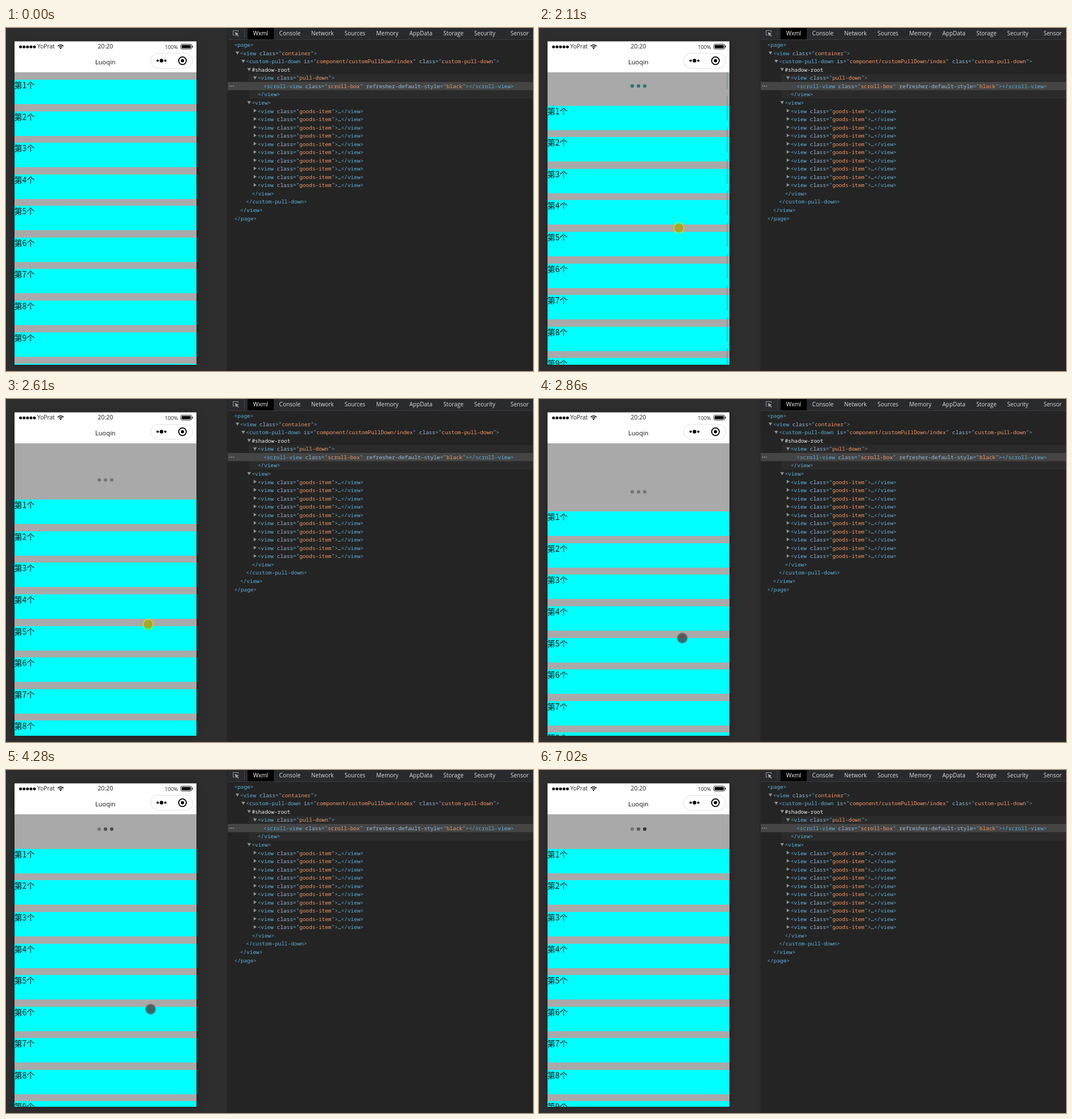
An HTML page with a canvas that plays this animation: 927x604 px, repeating every 7.18 s.

```html
<!DOCTYPE html>
<html lang="en">
<head>
<meta charset="utf-8">
<title>Pull down to refresh</title>
<style>
html, body { margin: 0; width: 100%; height: 100%; overflow: hidden; background: #2e2e2e; }
canvas { display: block; }
</style>
</head>
<body>
<canvas id="stage" width="927" height="604"></canvas>
<script>
const ctx = document.getElementById('stage').getContext('2d');
const LOOP = 7180, PRESS = 1350, RELEASE = 2860, BLINK = 3500;
const SANS = '"Open Sans", "Noto Sans", sans-serif';
const CJK = '"Noto Sans CJK SC", "Noto Sans CJK", "Noto Sans CJK JP", sans-serif';
const MONO = '"Noto Sans Mono", "DejaVu Sans Mono", monospace';
const TAG = '#5db0d7', ATTR = '#9bbbdc', VALUE = '#f29766';
const PHONE = { x: 15, y: 23.5, w: 320, h: 569.5 };
const PITCH = 55.57, ITEM_H = 43, REST = 47.8;

// Pointer path: time, x, y
const path = [
  [130, 723, 573], [600, 246, 285], [740, 240, 277], [1350, 236, 279], [1820, 236, 279],
  [2110, 246, 352], [2610, 250, 397], [RELEASE, 252, 421], [4280, 252, 421],
  [4510, 795, 479], [4800, 795, 479], [5640, 823, 596]
];

function pointerAt(t) {
  const i = path.findIndex(p => p[0] > t);
  if (i < 1) return null;
  const [a, b] = [path[i - 1], path[i]];
  const k = (t - a[0]) / (b[0] - a[0]);
  return { x: a[1] + (b[1] - a[1]) * k, y: a[2] + (b[2] - a[2]) * k };
}

const dragged = t => Math.max(0, 0.9 * (pointerAt(t).y - 279) - 20);

// The list follows the drag, then springs back to its resting place
function pullAt(t) {
  if (t < PRESS) return 0;
  if (t < RELEASE) return dragged(t);
  return REST + (dragged(RELEASE) - REST) * Math.exp((RELEASE - t) / 114);
}

function rect(x, y, w, h, color) {
  ctx.fillStyle = color;
  ctx.fillRect(x, y, w, h);
}

function disc(x, y, r, color) {
  ctx.fillStyle = color;
  ctx.beginPath();
  ctx.arc(x, y, r, 0, 7);
  ctx.fill();
}

function arc(x, y, r, from, to, width) {
  ctx.strokeStyle = '#000';
  ctx.lineWidth = width;
  ctx.beginPath();
  ctx.arc(x, y, r, from, to);
  ctx.stroke();
}

function poly(points, fill, stroke) {
  ctx.beginPath();
  points.forEach(([x, y]) => ctx.lineTo(x, y));
  ctx.closePath();
  ctx.fillStyle = fill;
  ctx.fill();
  if (stroke) {
    ctx.strokeStyle = stroke;
    ctx.lineWidth = 1;
    ctx.stroke();
  }
}

function pill(x, y, w, h, r, fill, stroke) {
  ctx.beginPath();
  ctx.roundRect(x, y, w, h, r);
  if (fill) { ctx.fillStyle = fill; ctx.fill(); }
  if (stroke) { ctx.strokeStyle = stroke; ctx.lineWidth = 1; ctx.stroke(); }
}

function text(str, x, y, size, color, font = SANS, align = 'left') {
  ctx.font = size + 'px ' + font;
  ctx.textAlign = align;
  ctx.fillStyle = color;
  ctx.fillText(str, x, y);
}

// Markup tree
const open = (name, attrs = {}) => {
  const parts = [['<' + name, TAG]];
  for (const key in attrs) {
    parts.push([' ' + key, ATTR], ['="', TAG], [attrs[key], VALUE], ['"', TAG]);
  }
  return [...parts, ['>', TAG]];
};
const close = name => [['</' + name + '>', TAG]];
const item = [...open('view', { class: 'goods-item' }), ['…', '#ddd'], ...close('view')];
// indent, arrow, parts
const rows = [
  [0, '', open('page')],
  [1, 'v', open('view', { class: 'container' })],
  [2, 'v', open('custom-pull-down', { is: 'component/customPullDown/index', class: 'custom-pull-down' })],
  [3, 'v', [['#shadow-root', '#f0f0f0']]],
  [4, 'v', open('view', { class: 'pull-down' })],
  [5, '', [...open('scroll-view', { class: 'scroll-box', 'refresher-default-style': 'black' }), ...close('scroll-view')]],
  [4, '', close('view')],
  [3, 'v', open('view')],
  ...Array(10).fill([4, '>', item]),
  [3, '', close('view')],
  [2, '', close('custom-pull-down')],
  [1, '', close('view')],
  [0, '', close('page')]
];

function drawTree() {
  rect(427, 81, 500, 43, '#2b2b2b');
  rect(390, 95, 537, 14.5, '#454545');
  for (let i = 0; i < 3; i++) disc(393.5 + i * 3.2, 102.4, 0.9, '#aaa');
  rows.forEach(([depth, arrow, parts], i) => {
    const y = 30 + i * 14.54;
    let x = 401.5 + depth * 10.3;
    if (arrow === 'v') poly([[x - 8, y - 3], [x - 1.5, y - 3], [x - 4.7, y + 2.5]], '#919191');
    if (arrow === '>') poly([[x - 7, y - 4], [x - 1.8, y - 0.8], [x - 7, y + 2.4]], '#919191');
    for (const [str, color] of parts) {
      text(str, x, y + 3.2, 9.42, color, MONO);
      x += ctx.measureText(str).width;
    }
  });
}

function drawPanel() {
  rect(388, 0, 2, 604, '#292929');
  rect(390, 0, 537, 604, '#242424');
  rect(390, 0, 537, 20, '#292a2d');
  rect(390, 20, 537, 1, '#3b3b3d');
  rect(425, 0, 46, 20, '#000');
  rect(419, 2, 1, 15, '#47484b');
  ctx.strokeStyle = '#9a9a9a';
  ctx.lineWidth = 1;
  ctx.beginPath();
  ctx.moveTo(402, 12.5);
  ctx.lineTo(399.5, 12.5);
  ctx.lineTo(399.5, 4.5);
  ctx.lineTo(408.5, 4.5);
  ctx.lineTo(408.5, 7);
  ctx.stroke();
  poly([[402.5, 7], [409.5, 10], [406.8, 11], [409.5, 14], [408.5, 15], [405.6, 12.2], [404.3, 14.5]], '#a5a5a5');
  [['Wxml', 447.8], ['Console', 499.3], ['Network', 556.7], ['Sources', 613.8], ['Memory', 670.8],
    ['AppData', 729.7], ['Storage', 787], ['Security', 842.2], ['Sensor', 903.5]]
    .forEach(([name, x], i) => text(name, x, 12.8, 10, i ? '#dcdcdc' : '#fff', SANS, 'center'));
  drawTree();
}

function drawHeader() {
  rect(PHONE.x, PHONE.y, PHONE.w, 54.5, '#fff');
  for (let i = 0; i < 5; i++) disc(25.6 + i * 6.1, 33.2, 2.5, '#000');
  text('YoPrat', 55, 36.4, 10.2, '#222');
  for (const r of [3.8, 6.8]) arc(96, 36.5, r, -Math.PI * 0.77, -Math.PI * 0.23, 1.5);
  disc(96, 35.8, 1.3, '#000');
  text('20:20', 174.8, 36, 10.6, '#222', SANS, 'center');
  text('100%', 302.5, 36.8, 9.2, '#222', SANS, 'right');
  pill(307.5, 28.5, 19, 8.5, 2, null, '#222');
  pill(309, 30, 16, 5.5, 1, '#000');
  rect(327.5, 31, 1.3, 3.5, '#222');
  text('Luoqin', 174.8, 64, 11, '#111', SANS, 'center');
  pill(254.5, 44.5, 74, 26.5, 13.2, '#fff', '#e0e0e0');
  for (let i = -1; i < 2; i++) disc(273.5 + i * 6.8, 57.5, i ? 2.1 : 3.2, '#000');
  arc(310.4, 57.6, 6.7, 0, 7, 1.8);
  disc(310.4, 57.6, 2.9, '#000');
}

// Each dot darkens in turn, then fades back
function dotColor(i, t) {
  const cycle = 880;
  const phase = (t - 5560 - i * cycle / 3 + 9 * cycle) % cycle;
  const dark = t < BLINK ? 0 : Math.max(0, 1 - phase / 480, 1 - (cycle - phase) / 290);
  const level = Math.round(117 - 66 * dark);
  return `rgb(${level},${level},${level})`;
}

function drawPhone(t) {
  const shift = pullAt(t);
  const barShown = t > 1950 && t < 2250;
  ctx.save();
  ctx.shadowColor = 'rgba(0,0,0,.3)';
  ctx.shadowBlur = 14;
  rect(PHONE.x, PHONE.y, PHONE.w, PHONE.h, '#a9a9a9');
  ctx.restore();
  ctx.save();
  ctx.beginPath();
  ctx.rect(PHONE.x, PHONE.y, PHONE.w, PHONE.h);
  ctx.clip();
  if (shift) {
    for (let i = 0; i < 3; i++) {
      disc(164 + i * 11, 56.2 + shift, 3.1, barShown ? '#2f7474' : dotColor(i, t));
    }
  }
  for (let i = 0; i < 10; i++) {
    const y = Math.round(91 + shift + i * PITCH);
    rect(15, y, 320, ITEM_H, '#0ff');
    text('第' + (i + 1) + '个', 14.6, y + 15, 14, '#111', CJK);
  }
  if (barShown) {
    for (let i = -1; i < 9; i++) rect(330, 120 + i * PITCH, 2, ITEM_H, 'rgba(100,140,140,.5)');
  }
  drawHeader();
  ctx.restore();
}

function drawPointer(t) {
  const p = pointerAt(t);
  if (!p) return;
  const { x, y } = p;
  if (x > 335) {
    const shape = [[0, 0], [0, 16], [3.7, 12.6], [6.2, 18.3], [8.6, 17.2], [6.2, 11.7], [11.3, 11.5]];
    poly(shape.map(([dx, dy]) => [x + dx, y + dy]), '#fff', '#000');
  } else if (t >= PRESS && t < RELEASE) {
    disc(x, y, 10, 'rgba(231,231,0,.5)');
    disc(x, y, 8, 'rgba(127,127,0,.45)');
  } else {
    const glow = ctx.createRadialGradient(x, y, 6, x, y, 10.5);
    glow.addColorStop(0, 'rgba(70,70,70,.82)');
    glow.addColorStop(0.45, 'rgba(75,75,75,.7)');
    glow.addColorStop(1, 'rgba(90,90,90,0)');
    disc(x, y, 10.5, glow);
  }
}

const start = performance.now();
function frame() {
  const t = (performance.now() - start) % LOOP;
  rect(0, 0, 927, 604, '#2e2e2e');
  drawPhone(t);
  drawPanel();
  drawPointer(t);
  requestAnimationFrame(frame);
}
frame();
</script>
</body>
</html>
```
